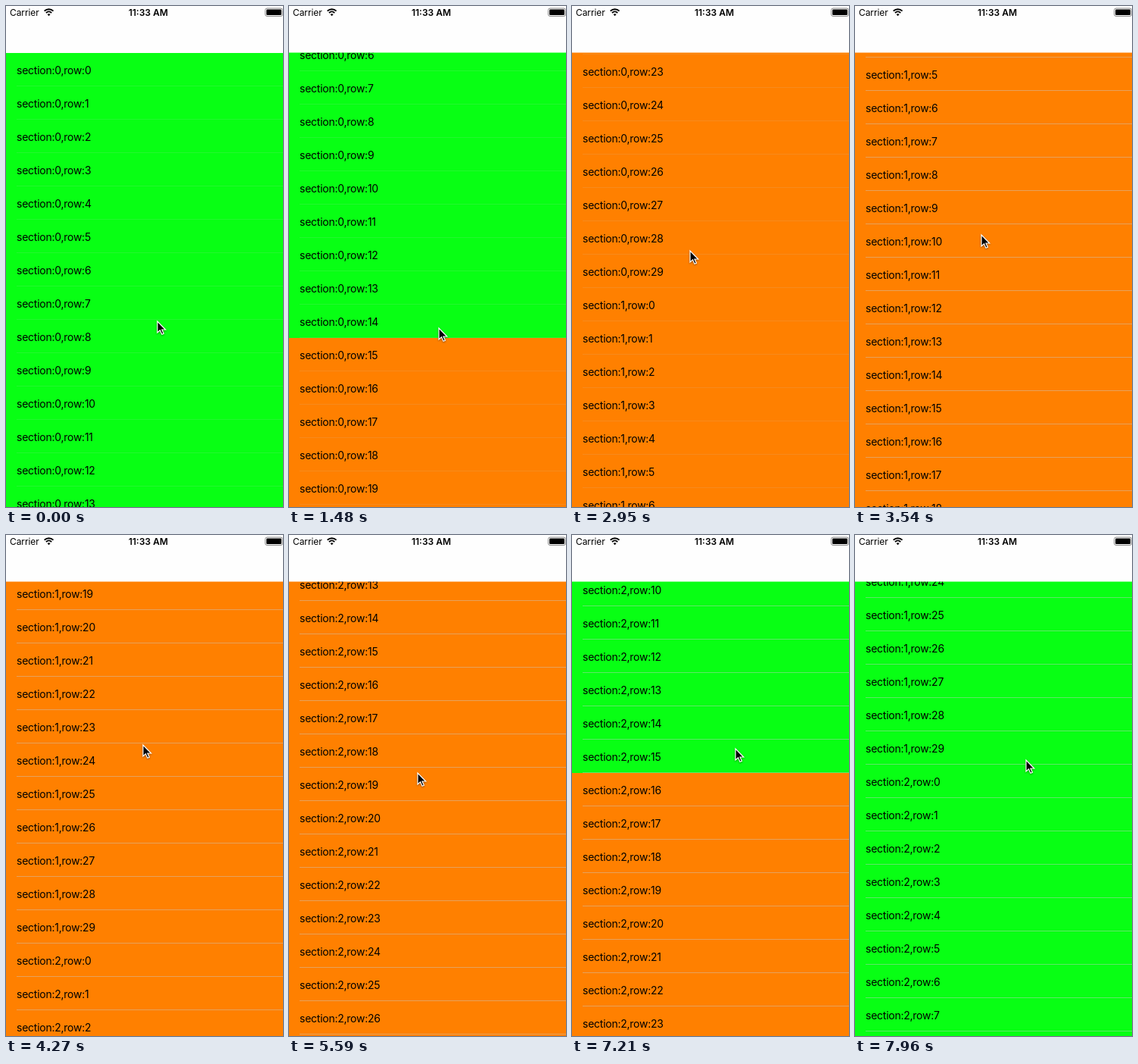
Recreate the animation shown at these times as an HTML page. Size 366 by 661 pixels, loop 8 s.

```html
<!DOCTYPE html>
<html lang="en">
<head>
<meta charset="utf-8">
<title>Table scroll</title>
<style>
  html, body { margin: 0; width: 100%; height: 100%; overflow: hidden; background: #fff; }
  body { position: relative; font-family: Inter, "Open Sans", sans-serif; color: #000; }
  #list { position: absolute; top: 0; left: 0; width: 366px; height: 661px; overflow: hidden; --line: .14; }
  .row {
    position: absolute; left: 0; top: 0; width: 366px; height: 44px; box-sizing: border-box;
    padding-left: 14px; font-size: 14px; line-height: 45px; letter-spacing: -.25px; white-space: nowrap;
  }
  .row::after {
    content: ""; position: absolute; left: 14px; right: 0; bottom: 0; height: 1px;
    background: rgb(200 199 204 / var(--line));
  }
  #nav {
    position: absolute; left: 0; top: 0; width: 366px; height: 62px;
    background: linear-gradient(#fefefe 61px, #fefefe88 0);
    font-size: 12px; line-height: 17px; white-space: nowrap;
  }
  #nav span { position: absolute; top: 0; }
  #carrier { left: 5px; letter-spacing: -.1px; }
  #clock { left: 138px; width: 100px; text-align: center; font-weight: 600; }
  svg { position: absolute; left: 0; top: 0; overflow: visible; }
</style>
</head>
<body>
<div id="list"></div>
<div id="nav">
  <span id="carrier">Carrier</span>
  <span id="clock">11:33 AM</span>
  <svg width="366" height="20">
    <g fill="none" stroke="#000" stroke-width="2">
      <path d="M50.7 6.6a8.4 8.4 0 0 1 11.8 0"/>
      <path d="M53 9.1a5.1 5.1 0 0 1 7.2 0"/>
    </g>
    <path d="M56.6 13.2l-2-2.1a2.9 2.9 0 0 1 4 0z"/>
    <rect x="342.5" y="3" width="23" height="10.5" rx="2.5" fill="none" stroke="#888"/>
    <rect x="344" y="4.5" width="20" height="7.5" rx="1.3"/>
  </svg>
</div>
<svg id="cursor" width="14" height="20">
  <path d="M0 0V15L3.5 11.8 6 17.2 8.4 16.2 6 11H10.8Z" stroke="#fff" stroke-width="1.2"
    style="filter: drop-shadow(0 1px 1px #0006)"/>
</svg>
<script>
const LOOP = 8000, ROW = 44, TOP = 62, PER_SECTION = 30, TOTAL = 90;
const GREEN = '#08ff14', ORANGE = '#ff8000';

// time, scroll offset, pointer x, pointer y
const keys = [
  [0, 0, 200, 416], [300, 0, 200, 416], [740, 0, 197, 432], [890, 0, 197, 432],
  [1190, 115, 197, 430], [1480, 284, 198, 425], [2950, 1010, 156, 323],
  [4270, 2163, 181, 277], [5580, 3231, 170, 314], [5880, 3335, 183, 303],
  [6180, 3357, 195, 290], [6620, 3359, 211, 274], [6770, 3325, 213, 277],
  [7960, 2399, 226, 297], [8110, 2290, 228, 300]
];

// The picture refreshes about seven times a second, in bursts of eight.
const bursts = [450, 1040, 2210, 3400, 4560, 5730, 6920, 8110];

function refreshTime(t) {
  if (t < bursts[0]) return 0;
  let i = 0;
  while (i < bursts.length - 2 && t >= bursts[i + 1]) i++;
  const step = (bursts[i + 1] - bursts[i]) / (i ? 8 : 4);
  const n = Math.floor((t + 5 - bursts[i]) / step);
  return Math.round((bursts[i] + n * step) / 10) * 10;
}

function poseAt(t) {
  let i = 0;
  while (i < keys.length - 2 && t >= keys[i + 1][0]) i++;
  const a = keys[i], b = keys[i + 1];
  const k = (t - a[0]) / (b[0] - a[0]);
  return a.slice(1).map((v, j) => Math.round(v + (b[j + 1] - v) * k));
}

const list = document.getElementById('list');
const cursor = document.getElementById('cursor');
const rows = Array.from({ length: 15 }, () => {
  const el = document.createElement('div');
  el.className = 'row';
  return list.appendChild(el);
});

// Rows revealed while scrolling down are orange, those revealed going up are green.
function rowColor(n, t) {
  return n < 15 || (t > 6620 && n < 76) ? GREEN : ORANGE;
}

let shown = -1;
function draw(now) {
  const t = refreshTime(now % LOOP);
  if (t !== shown) {
    shown = t;
    const [scroll, x, y] = poseAt(t);
    const first = Math.floor(scroll / ROW);
    rows.forEach((el, i) => {
      const n = first + i;
      el.hidden = n >= TOTAL;
      el.textContent = `section:${Math.floor(n / PER_SECTION)},row:${n % PER_SECTION}`;
      el.style.background = rowColor(n, t);
      el.style.transform = `translateY(${TOP + n * ROW - scroll}px)`;
    });
    list.style.setProperty('--line', t < 3300 ? .14 : .45);
    cursor.style.transform = `translate(${x}px, ${y}px)`;
  }
}

function loop() {
  draw(performance.now());
  requestAnimationFrame(loop);
}
loop();
</script>
</body>
</html>
```
